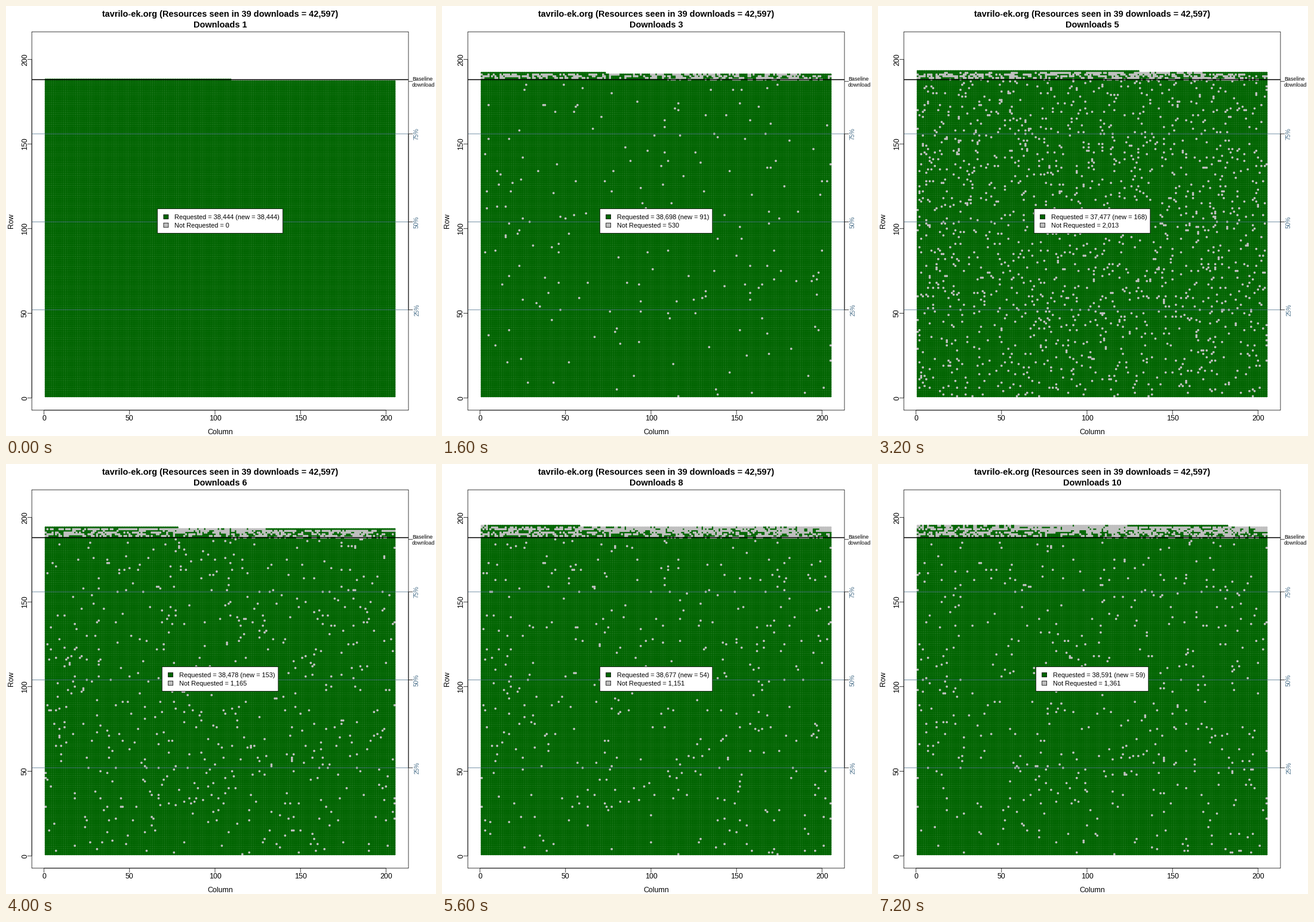
Animation of 720x720 px, one loop 8 s. Source, as a matplotlib script:

```python
import numpy as np
import matplotlib.pyplot as plt
from matplotlib.animation import FuncAnimation
from matplotlib.patches import Rectangle

plt.rcParams["font.family"] = "Liberation Sans"

SIZE = 720
COLS = 205
LEFT, RIGHT, TOP, BOTTOM = 43.2, 673.92, 43.2, 676.8
MID_X, MID_Y = (LEFT + RIGHT) / 2, (TOP + BOTTOM) / 2
DX = (RIGHT - LEFT) / 1.08 / 204
DY = (BOTTOM - TOP) / 1.08 / 207
DOT = 3.7
GREEN, GRAY, SLATE = "#006400", "#bebebe", "#4a708b"
THIN = 0.75

# Resources known after each download, and how many were not requested in it
TOTAL = [38444, 39137, 39228, 39322, 39490, 39643, 39774, 39828, 39893, 39952]
MISSED = [0, 174, 530, 662, 2013, 1165, 1148, 1151, 1248, 1361]
# Share of each later batch that is skipped once it is no longer new
SKIP = [0.47, 0.2, 0.75, 0.8, 0.5, 0.85, 0.35, 0.95]


def px(col):
    return LEFT + 0.04 / 1.08 * (RIGHT - LEFT) + (col - 1) * DX


def py(row):
    return BOTTOM - 0.04 / 1.08 * (BOTTOM - TOP) - (row - 1) * DY


rng = np.random.default_rng(39)
ids = np.arange(TOTAL[-1])
points = np.column_stack([px(ids % COLS + 1), py(ids // COLS + 1)])
clumps = np.convolve(rng.random(TOTAL[-1]), [0.65, 0.35], "same")
habit = rng.permutation(TOTAL[0])  # the first ones are skipped most often


def missed_mask(k):
    """Which of the resources known at download k are not requested in it."""
    local = np.random.default_rng(100 + k)
    mask = np.zeros(TOTAL[k], bool)
    for b in range(1, k):
        batch = ids[TOTAL[b - 1]:TOTAL[b]]
        score = clumps[batch] + 0.15 * local.random(len(batch))
        mask[batch[np.argsort(score)[:round(SKIP[b - 1] * len(batch))]]] = True
    count = MISSED[k] - mask.sum()
    kept = int(0.45 * count)
    mask[habit[:kept]] = True
    mask[local.choice(habit[kept:], count - kept, replace=False)] = True
    return mask


masks = [missed_mask(k) for k in range(len(TOTAL))]

fig = plt.figure(figsize=(10, 10), dpi=72, facecolor="white")
ax = fig.add_axes([0, 0, 1, 1])
ax.set(xlim=(0, SIZE), ylim=(SIZE, 0))
ax.axis("off")


def line(x0, y0, x1, y1, color="black", lw=THIN):
    ax.plot([x0, x1], [y0, y1], color=color, lw=lw, zorder=3,
            snap=False, solid_capstyle="butt")


def label(x, y, s, size=12.4, ha="center", z=6, **kw):
    return ax.text(x, y, s, fontsize=size, ha=ha, va="baseline", zorder=z, **kw)


def side_label(x, y, s, size=12.4, color="black"):
    label(x, y, s, size, rotation=90, rotation_mode="anchor", color=color)


def box(x, y, w, h, fill, z):
    return ax.add_patch(Rectangle((x, y), w, h, fc=fill, ec="black", lw=THIN,
                                  zorder=z, snap=False))


# Frame, axes and guide lines
box(LEFT, TOP, RIGHT - LEFT, BOTTOM - TOP, "none", 4)
line(px(0), BOTTOM, px(200), BOTTOM)
line(LEFT, py(0), LEFT, py(200))
line(RIGHT, py(52), RIGHT, py(156))
for v in range(0, 201, 50):
    line(px(v), BOTTOM, px(v), BOTTOM + 7.2)
    label(px(v), 694, str(v))
    line(LEFT, py(v), LEFT - 7.2, py(v))
    side_label(35, py(v), str(v))
label(MID_X, 717, "Column")
side_label(12, MID_Y, "Row")

for pct in (25, 50, 75):
    y = py(2.08 * pct)
    line(LEFT, y, RIGHT, y, SLATE)
    line(RIGHT, y, RIGHT + 7.2, y)
    side_label(691, y, f"{pct}%", 10, SLATE)
line(LEFT, py(188), RIGHT, py(188), lw=1.5)
line(RIGHT, py(187), RIGHT + 7.2, py(187))
label(680, 125, "Baseline", 8.9, "left")
label(680, 135, "download", 8.9, "left")

# Titles, dots and legend
label(MID_X, 18, "tavrilo-ek.org (Resources seen in 39 downloads = 42,597)",
      14.5, weight="bold")
title = label(MID_X, 36, "", 14.5, weight="bold")
dots = ax.scatter(points[:, 0], points[:, 1], s=DOT ** 2,
                  c=[GREEN] * len(points), linewidths=0, zorder=2)
panel = box(0, 339.5, 10, 41, "white", 7)
swatches = [box(0, 349.3, 8, 7.4, GREEN, 8), box(0, 363.3, 8, 7.4, GRAY, 8)]
entries = [label(0, y, "", 11, "left", 8) for y in (357, 371)]


def update(k):
    mask = masks[k]
    known = points[:TOTAL[k]]
    dots.set_offsets(np.concatenate([known[~mask], known[mask]]))
    dots.set_facecolor([GREEN] * (TOTAL[k] - MISSED[k]) + [GRAY] * MISSED[k])

    title.set_text(f"Downloads {k + 1}")
    new = TOTAL[k] - (TOTAL[k - 1] if k else 0)
    entries[0].set_text(f"Requested = {TOTAL[k] - MISSED[k]:,} (new = {new:,})")
    entries[1].set_text(f"Not Requested = {MISSED[k]:,}")

    width = entries[0].get_window_extent(fig.canvas.get_renderer()).width + 34
    x = MID_X - width / 2
    panel.set_x(x)
    panel.set_width(width)
    for swatch, entry in zip(swatches, entries):
        swatch.set_x(x + 10.3)
        entry.set_x(x + 28.5)
    return [dots, title, panel, *swatches, *entries]


anim = FuncAnimation(fig, update, frames=len(TOTAL), interval=800, repeat=True,
                     repeat_delay=0, blit=False)
plt.show()
```
